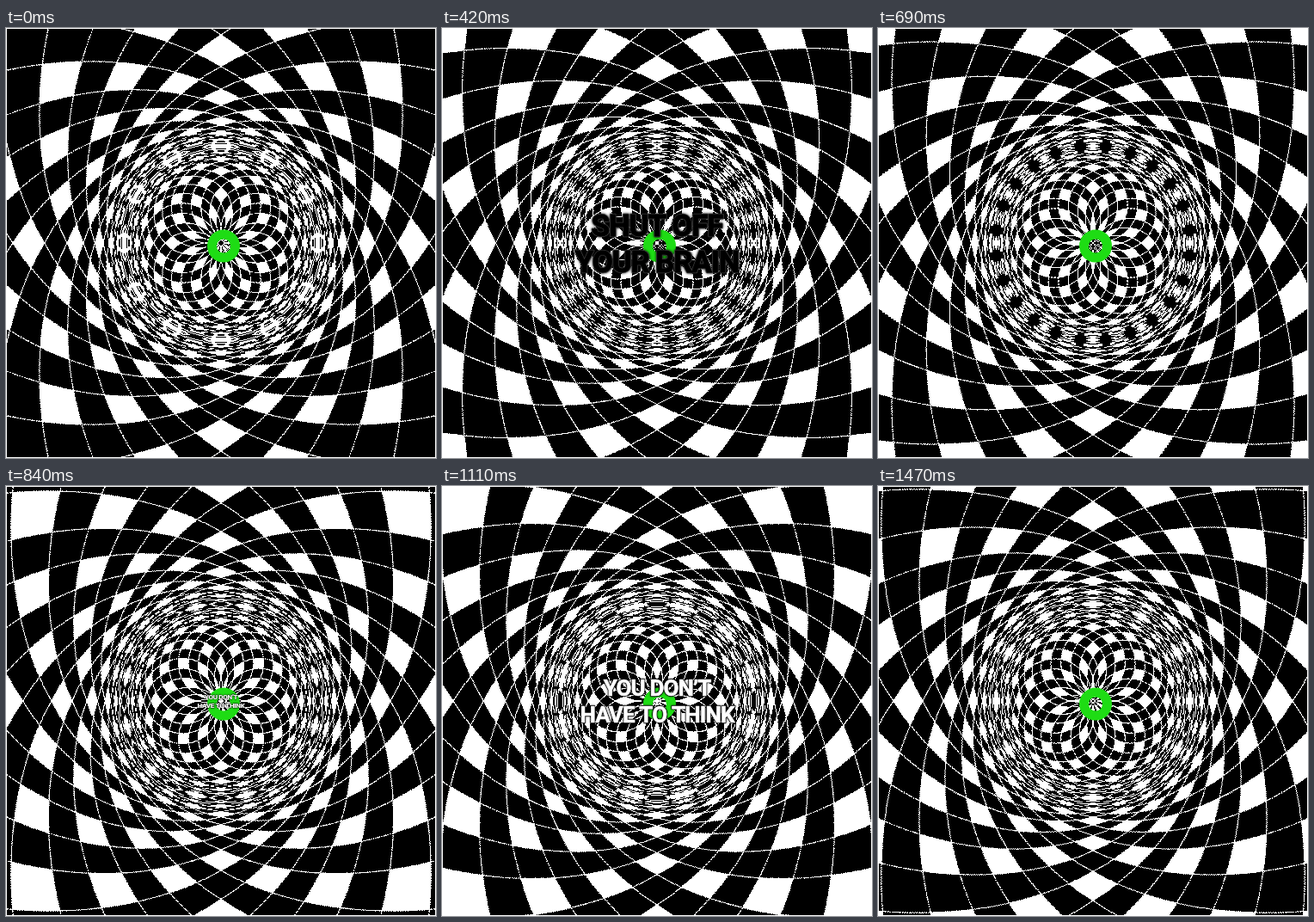
An HTML page with a canvas that plays this animation: 500x500 px, repeating every 1.5 s.

```html
<!DOCTYPE html>
<html>
<head>
<meta charset="utf-8">
<style>
html, body { margin: 0; width: 100%; height: 100%; overflow: hidden; background: #000; }
canvas { display: block; }
</style>
</head>
<body>
<canvas id="stage" width="500" height="500"></canvas>
<script>
const SIZE = 500, STEP = 30, LOOP = 1500;
const ARMS = 12, RING = 113, TWIST = 1.5, SPEED = 0.12;
const PHASE = TWIST * Math.log(129.5) - 0.5;

const ctx = document.getElementById('stage').getContext('2d');
const image = ctx.createImageData(SIZE, SIZE);
const pixels = new Uint32Array(image.data.buffer);

// Two mirrored spiral families; their pitch collapses at the ring radius.
const left = new Float32Array(SIZE * SIZE);
const right = new Float32Array(SIZE * SIZE);
const edge = new Float32Array(SIZE * SIZE);
for (let y = 0, i = 0; y < SIZE; y++) {
  for (let x = 0; x < SIZE; x++, i++) {
    const dx = x - 249.5, dy = y - 249.5;
    // Whole-pixel radii give the jagged edges and the dashed rings.
    const r = Math.round(Math.hypot(dx, dy));
    const d = Math.max(Math.abs(r - RING), 0.5);
    const depth = TWIST * Math.log(d) - PHASE + 100;
    const turn = ARMS * Math.atan2(dx, -dy) / (2 * Math.PI);
    left[i] = depth + turn;
    right[i] = depth - turn;
    // Half line width, in units of the stripe period.
    edge[i] = Math.min(0.55 * Math.hypot(TWIST / d, ARMS / (2 * Math.PI * Math.max(r, 1))), 0.04);
  }
}

function drawSpirals(shift) {
  for (let i = 0; i < pixels.length; i++) {
    const a = (left[i] - shift) % 1, b = (right[i] - shift) % 1, e = edge[i];
    const cell = a < 0.5 && b < 0.5;
    const line = a < e || a > 1 - e || Math.abs(a - 0.5) < e ||
                 b < e || b > 1 - e || Math.abs(b - 0.5) < e;
    pixels[i] = cell || line ? 0xffffffff : 0xff000000;
  }
  ctx.putImageData(image, 0, 0);
  ctx.strokeStyle = '#fff';
  ctx.lineWidth = 1;
  ctx.strokeRect(0.5, 0.5, SIZE - 1, SIZE - 1);
}

function drawRing() {
  ctx.strokeStyle = '#1edc14';
  ctx.lineWidth = 11;
  ctx.beginPath();
  ctx.arc(253, 253.5, 13.5, 0, 2 * Math.PI);
  ctx.stroke();
}

function drawText(lines, scale, fill, outline, blur) {
  ctx.save();
  ctx.translate(250, 250);
  ctx.scale(scale, scale);
  ctx.font = '700 36px Roboto, sans-serif';
  ctx.letterSpacing = '-1.2px';
  ctx.textAlign = 'center';
  ctx.lineJoin = 'round';
  ctx.shadowColor = '#000';
  ctx.shadowBlur = blur;
  ctx.strokeStyle = outline;
  ctx.lineWidth = 2.5;
  lines.forEach((line, i) => ctx.strokeText(line, 0, -8 + 43 * i));
  ctx.shadowBlur = 0;
  ctx.fillStyle = ctx.strokeStyle = fill;
  ctx.lineWidth = 0.8;
  lines.forEach((line, i) => {
    ctx.fillText(line, 0, -8 + 43 * i);
    ctx.strokeText(line, 0, -8 + 43 * i);
  });
  ctx.restore();
}

function draw(now) {
  const t = Math.floor(now % LOOP / STEP) * STEP;
  drawSpirals(SPEED * t / STEP);
  drawRing();
  if (t >= 120 && t < 600)
    drawText(['SHUT OFF', 'YOUR BRAIN'], 0.94 + (t - 240) * 0.00016, '#000', '#3a3a3a', 3);
  if (t >= 750 && t < 1380)
    drawText(['YOU DON’T', 'HAVE TO THINK'], (t - 720) / 540, '#fff', '#000', 2);
}

let start;
function frame(now) {
  start ??= now;
  draw(now - start);
  requestAnimationFrame(frame);
}
requestAnimationFrame(frame);
</script>
</body>
</html>
```
